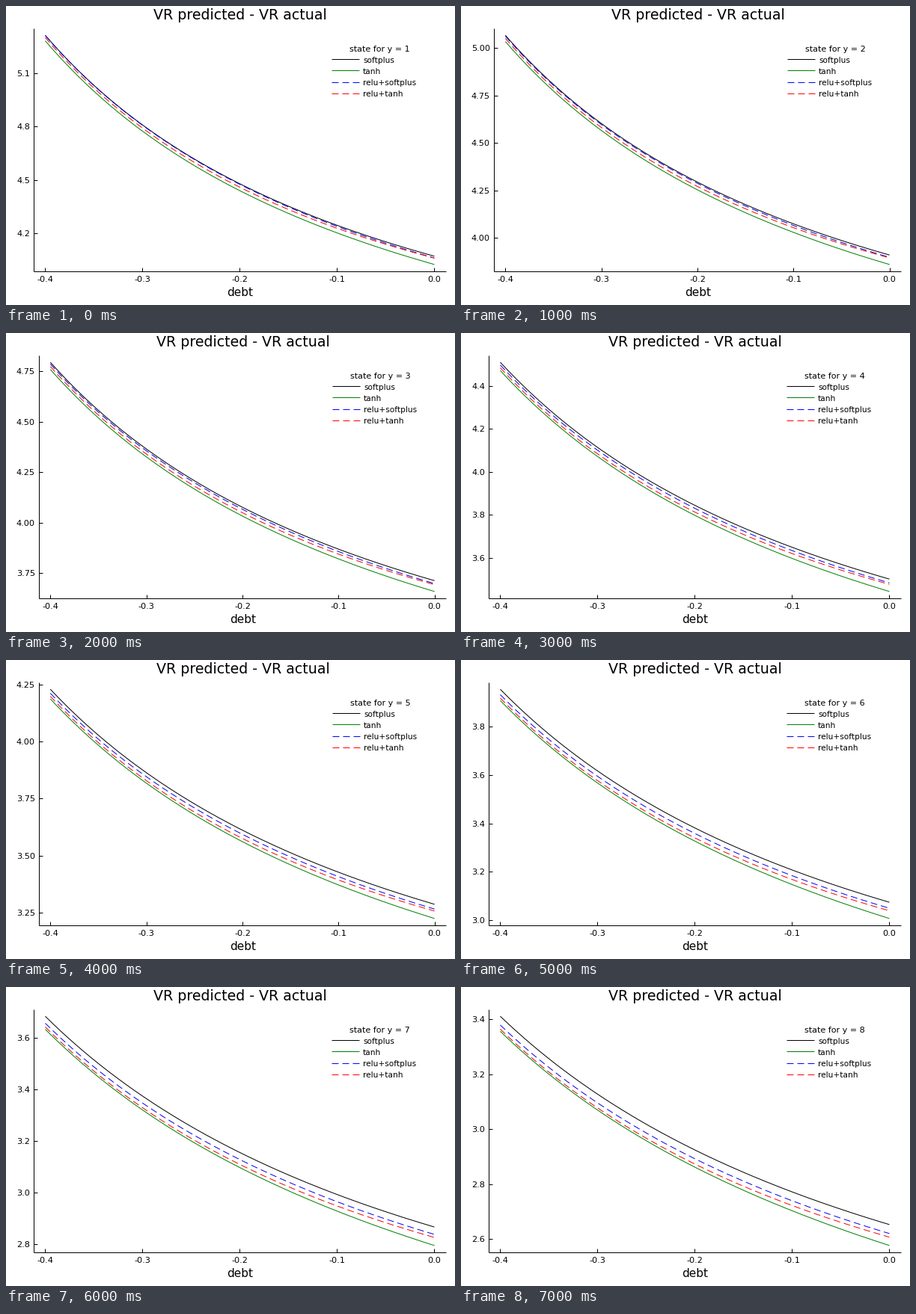
Write a matplotlib script that moves like this. It is 600 by 400 pixels and loops after 8000 ms.

```python
import numpy as np
import matplotlib.pyplot as plt
from matplotlib.animation import FuncAnimation

W, H, DPI = 600, 400, 100
PX = 72 / DPI                      # points per pixel
RIGHT, TOP, BOTTOM = 588, 30, 355
PAD = 0.03 / 1.06                  # axis margin on each side
Y_HI = TOP + PAD * (BOTTOM - TOP)
Y_LO = BOTTOM - PAD * (BOTTOM - TOP)

TICK_STEPS = [0.3, 0.25, 0.25, 0.2, 0.25, 0.2, 0.2, 0.2]
STYLES = {
    "softplus": ("black", None),
    "tanh": ("green", None),
    "relu+softplus": ("blue", (9, 5)),
    "relu+tanh": ("red", (9, 5)),
}

# the highest value falls smoothly through these points
highest = np.poly1d(np.polyfit([0, 1, 3, 5, 7],
                               [5.312, 5.068, 4.511, 3.952, 3.411], 4))

plt.rcParams["font.family"] = "DejaVu Sans"
fig = plt.figure(figsize=(W / DPI, H / DPI), dpi=DPI, facecolor="white")
ax = fig.add_axes([0, 0, 1, 1])
u = np.linspace(0, 1, 201)


def line(x, y, color="black", dashes=None):
    art, = ax.plot(x, y, color=color, lw=PX, solid_capstyle="butt")
    if dashes:
        art.set_dashes(dashes)


def text(x, y, label, size, ha="center"):
    ax.text(x, y, label, fontsize=size * PX, ha=ha, va="baseline")


def curves(k):
    """Pixel heights: a hyperbola on top, the others a growing gap below."""
    gaps = {
        "softplus": 0 * u,
        "tanh": 7.4 + 3.7 * u + (0.8 + 0.6 * u**2) * k + 0.145 * k**2,
        "relu+softplus": (0.3 + 2.1 * u**2 + (0.75 - 0.25 * u**2) * k
                          + 0.125 * k**2),
        "relu+tanh": (3 - 0.4 * u + 1.8 * np.sin(np.pi * u)
                      + 1.05 * k + 0.14 * k**2),
    }
    bend = 1.05 - 0.037 * k
    drop = (1 + bend) * u / (1 + bend * u)
    top = Y_HI + (Y_LO - Y_HI - gaps["tanh"][-1]) * drop
    return {name: top + gap for name, gap in gaps.items()}


def draw_axes(k, left, x0, x1):
    line([left, left], [TOP, BOTTOM])
    line([left, RIGHT], [BOTTOM, BOTTOM])
    for q in np.linspace(0, 1, 5):
        x = x0 + q * (x1 - x0)
        line([x, x], [BOTTOM, BOTTOM - 5])
        text(x, 368.9, f"{0.4 * q - 0.4:.1f}", 11.2)

    step, high, span = TICK_STEPS[k], highest(k), 1.286 * 0.94**k
    low, margin = high - span, 0.03 * span
    digits = 2 if step == 0.25 else 1
    first = int(np.ceil((low - margin) / step))
    last = int(np.floor((high + margin) / step))
    for n in range(first, last + 1):
        y = Y_LO - (n * step - low) / span * (Y_LO - Y_HI)
        line([left, left + 5], [y, y])
        text(left - 5, y + 4, f"{n * step:.{digits}f}", 11.2, "right")


def draw_legend(k, x):
    text(x + 64.5, 61, f"state for y = {k + 1}", 11.1)
    for i, (name, style) in enumerate(STYLES.items()):
        y = 71.2 + 15.2 * i
        line([x, x + 36.5], [y, y], *style)
        text(x + 42, y + 4.6, name, 10.55, "left")


def update(k):
    ax.clear()
    ax.set_xlim(0, W)
    ax.set_ylim(H, 0)
    ax.axis("off")

    wide = TICK_STEPS[k] == 0.25   # two-digit labels push the axis right
    left = 43.9 if wide else 36.9
    pad = PAD * (RIGHT - left)
    x0, x1 = left + pad, RIGHT - pad
    middle = (left + RIGHT) / 2 + 0.6

    draw_axes(k, left, x0, x1)
    for name, y in curves(k).items():
        line(x0 + u * (x1 - x0), y, *STYLES[name])
    draw_legend(k, 436 if wide else 435)
    text(middle, 18, "VR predicted - VR actual", 19)
    text(middle, 388.4, "debt", 15.3)
    return []


anim = FuncAnimation(fig, update, frames=8, interval=1000, repeat=True,
                     repeat_delay=0, init_func=lambda: [])
plt.show()
```
